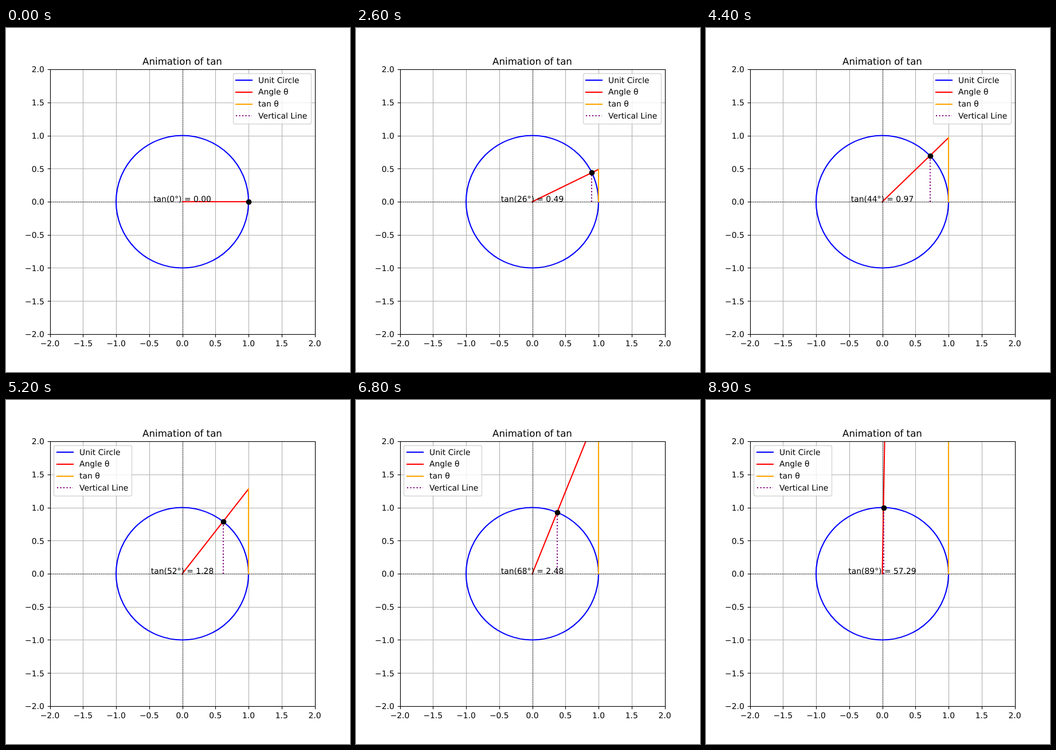
An HTML page for the animation above (9 s loop, 600 by 600 pixels).

```html
<!DOCTYPE html>
<html lang="en">
<head>
<meta charset="utf-8">
<title>Animation of tan</title>
<style>
  html, body { margin: 0; width: 100%; height: 100%; overflow: hidden; background: #fff; }
  svg { display: block; width: 600px; height: 600px; }
  text {
    font: 13.889px "DejaVu Sans", sans-serif;
    text-rendering: geometricPrecision;
    white-space: pre;
  }
</style>
</head>
<body>
<svg id="stage" viewBox="0 0 600 600"></svg>
<script>
const STEP_MS = 100, STEPS = 90;
const CX = 307.5, CY = 303, UNIT = 115.5;
const LINE = 2.0833, THIN = 1.1111;
const BLUE = '#0000ff', RED = '#ff0000', ORANGE = '#ffa500', PURPLE = '#800080';
const DOTS = '2.0833 3.4375', DASHES = '2.5694 1.1111';

const stage = document.getElementById('stage');
const px = x => CX + UNIT * x;
const py = y => CY - UNIT * y;
const snap = v => Math.floor(v + 0.5);
// The tiny bias settles ties toward the centre line.
const snapY = y => snap(py(y * (1 - 1e-9)));

function set(el, attrs) {
  for (const key in attrs) el.setAttribute(key, attrs[key]);
  return el;
}

function add(parent, tag, attrs) {
  const el = set(document.createElementNS('http://www.w3.org/2000/svg', tag), attrs);
  return parent.appendChild(el);
}

function line(parent, x1, y1, x2, y2, stroke, width, extra) {
  return add(parent, 'line', { x1, y1, x2, y2, stroke, 'stroke-width': width, ...extra });
}

function label(parent, x, y, content, anchor = 'middle') {
  const el = add(parent, 'text', { x, y, 'text-anchor': anchor });
  el.textContent = content;
  return el;
}

const square = { 'stroke-linecap': 'square' };
const dotted = { 'stroke-dasharray': DOTS };
const dashed = { 'stroke-dasharray': DASHES };

const clip = add(add(stage, 'defs'), 'clipPath', { id: 'axes' });
add(clip, 'rect', { x: 77, y: 72, width: 462, height: 462 });
add(stage, 'rect', { width: 600, height: 600, fill: '#fff' });

// Grid, ticks and tick labels
for (let i = -4; i <= 4; i++) {
  const v = i / 2, gx = snap(px(v)) + 0.5, gy = snapY(v) + 0.5;
  const name = (v < 0 ? '\u2212' : '') + Math.abs(v).toFixed(1);
  line(stage, gx, 72.5, gx, 534.5, '#b0b0b0', THIN);
  line(stage, 77.5, gy, 539.5, gy, '#b0b0b0', THIN);
  line(stage, gx, 534.5, gx, 539.4, '#000', THIN);
  line(stage, 72.6, gy, 77.5, gy, '#000', THIN);
  label(stage, px(v), 555, name);
  label(stage, 66.8, snap(py(v) + 5.3), name, 'end');
}

// Plot
const plot = add(stage, 'g', { 'clip-path': 'url(#axes)', fill: 'none' });
line(plot, 77.5, 303.5, 539.5, 303.5, '#000', 0.6944, dashed);
line(plot, 308.5, 534.5, 308.5, 72.5, '#000', 0.6944, dashed);
add(plot, 'circle', { cx: CX, cy: CY, r: UNIT, stroke: BLUE, 'stroke-width': LINE });
const ray = line(plot, CX, CY, CX, CY, RED, LINE, square);
const tangent = line(plot, 423, 303, 423, 303, ORANGE, LINE, square);
const drop = line(plot, 423, 303, 423, 303, PURPLE, LINE, dotted);
const point = add(plot, 'circle', { r: 4.861, fill: '#000' });

add(stage, 'rect', {
  x: 77.5, y: 72.5, width: 462, height: 462, fill: 'none', stroke: '#000', 'stroke-width': THIN
});
label(stage, CX, 64, 'Animation of tan').style.fontSize = '16.667px';
const readout = label(stage, CX, 303, '');

// Legend in either upper corner
function legend(edge, handle, textX) {
  const group = add(stage, 'g');
  add(group, 'rect', {
    x: edge, y: 79.5, width: 136, height: 88, rx: 2.78,
    fill: '#fff', stroke: '#ccc', 'stroke-width': 1.3889, opacity: 0.8
  });
  const rows = [
    ['Unit Circle', BLUE, 91, 96],
    ['Angle θ', RED, 112, 116],
    ['tan θ', ORANGE, 133, 137],
    ['Vertical Line', PURPLE, 153, 158]
  ];
  for (const [name, color, y, baseline] of rows) {
    line(group, handle, y, handle + 28, y, color, LINE, color === PURPLE ? dotted : square);
    label(group, textX, baseline, name, 'start');
  }
  return group;
}
const rightLegend = legend(396.5, 401, 440);
const leftLegend = legend(83.5, 89, 128);

function draw(degrees) {
  const angle = degrees * Math.PI / 180;
  const x = Math.cos(angle), y = Math.sin(angle), tan = Math.tan(angle);
  set(ray, degrees
    ? { x1: CX, x2: px(1), y2: py(tan) }
    : { x1: 308, x2: 423, y2: CY });
  set(tangent, { y2: snap(py(tan)) });
  set(drop, { x1: snap(px(x)), x2: snap(px(x)), y2: snap(py(y)) });
  set(point, { cx: snap(px(x)) + 0.5, cy: snap(py(y)) + 0.5 });
  readout.textContent = `tan(${degrees}°) = ${tan.toFixed(2)}`;

  // The legend moves aside once the tangent reaches it.
  const blocked = py(tan) < 167;
  rightLegend.style.display = blocked ? 'none' : '';
  leftLegend.style.display = blocked ? '' : 'none';
}

function tick() {
  draw(Math.floor(performance.now() / STEP_MS) % STEPS);
  requestAnimationFrame(tick);
}
tick();
</script>
</body>
</html>
```
